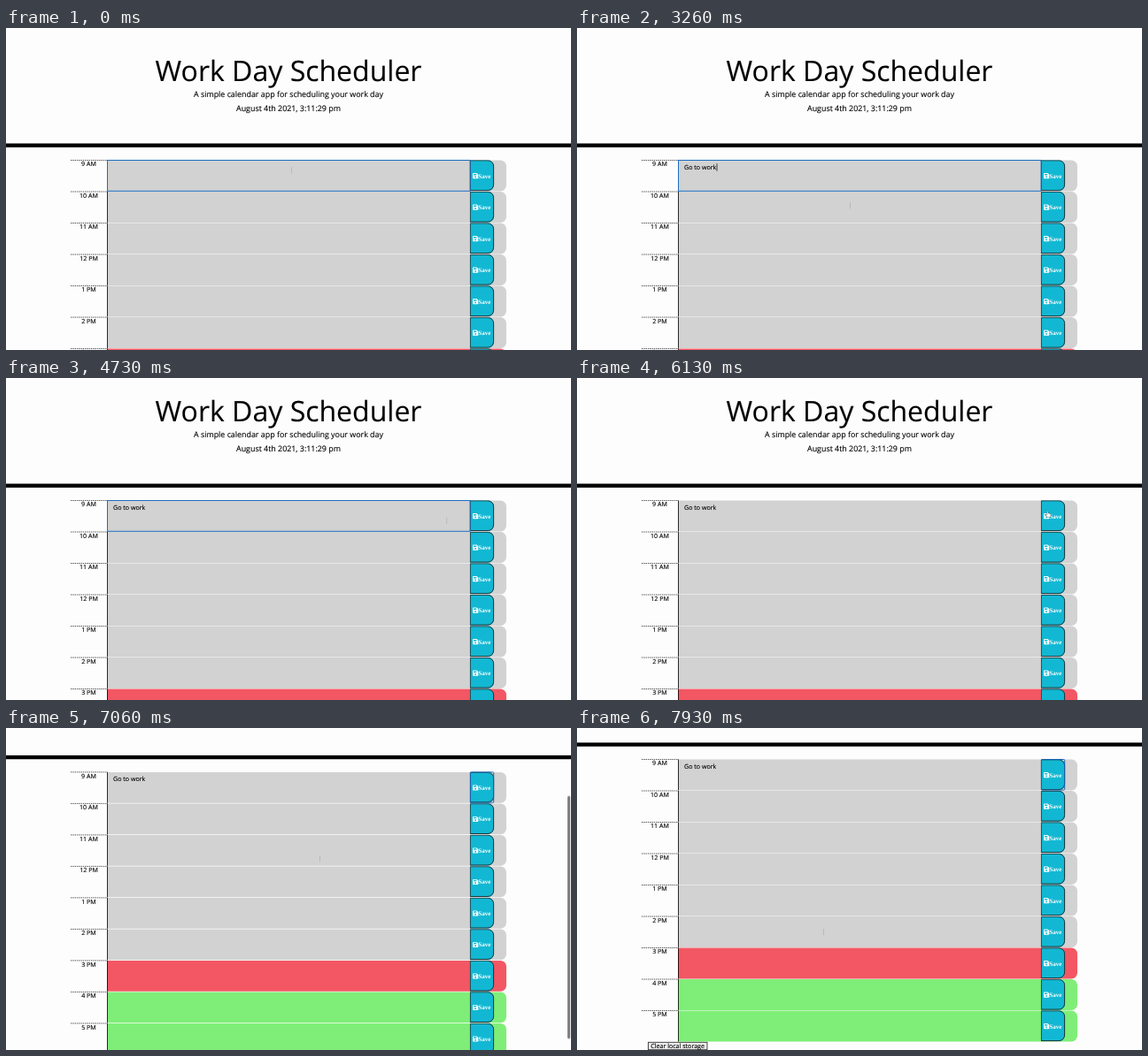
These frames come from a looping animation (638x364 px, 8 s). An HTML page:

```html
<!DOCTYPE html>
<html lang="en">
<head>
<meta charset="utf-8">
<title>Work Day Scheduler</title>
<style>
@property --s { syntax: '<number>'; inherits: true; initial-value: 0; }
html, body { margin: 0; width: 100%; height: 100%; overflow: hidden; background: #fdfdfd; }
svg { display: block; width: 638px; height: 364px; animation: scroll 8s linear infinite; }
text { font: 7.1px 'Open Sans', sans-serif; fill: #000; stroke: #000; stroke-width: .12; text-rendering: geometricPrecision; }
.mid { text-anchor: middle; }
.title { font-size: 32px; }
.lead { font-size: 8.89px; }
.save { font: bold 7.1px 'Liberation Serif', serif; fill: #fff; stroke: none; }

/* --s is the scroll offset shared by page and scrollbar */
#page { transform: translateY(calc(var(--s) * -1px)); }
#thumb { transform: translateY(calc(var(--s) * .75px)); animation: thumb 8s linear infinite; }
#cover { animation: type 8s step-end infinite; }
#caret { animation: caret 8s step-end infinite; }
#field { animation: blur 8s step-end infinite; }
#ring { animation: ring 8s step-end infinite; }
#pointer { animation: move 8s ease-in-out infinite; }
#beam { animation: beam 8s step-end infinite; }
#hand { animation: hand 8s step-end infinite; }
.edge { fill: none; stroke: #1c2426; stroke-width: .9; }
#row0 .edge { animation: press 8s step-end infinite; }

@keyframes scroll {
  0%, 41.6% { --s: 0; }
  42.5% { --s: 4; }
  44.1% { --s: 9.5; }
  45%, 83.3% { --s: 11; }
  84.1% { --s: 24; }
  85% { --s: 42; }
  85.75% { --s: 60.6; }
  87.5% { --s: 92; }
  89.1% { --s: 108; }
  91.6%, 95% { --s: 115; }
  99%, 100% { --s: 114; }
}
@keyframes thumb {
  0%, 41.7% { opacity: 0; }
  43.5%, 53.2% { opacity: 1; }
  57.5%, 83.3% { opacity: 0; }
  84.1%, 95% { opacity: 1; }
  98.7%, 100% { opacity: 0; }
}
@keyframes type {
  0% { transform: none; }
  9.1% { transform: translateX(5.2px); }
  10.4% { transform: translateX(9.5px); }
  11.7% { transform: translateX(11.3px); }
  13% { transform: translateX(13.9px); }
  14.3% { transform: translateX(18.1px); }
  15.6% { transform: translateX(20px); }
  17% { transform: translateX(25.5px); }
  18.2% { transform: translateX(29.8px); }
  20.75% { transform: translateX(32.7px); }
  23.25%, 100% { transform: translateX(36.5px); }
}
@keyframes caret {
  0%, 5%, 30%, 42.5%, 55.4%, 70%, 100% { opacity: 0; }
  .75%, 9.1%, 35.75%, 49.1%, 61.6% { opacity: 1; }
}
@keyframes blur { 0% { opacity: 1; } 70%, 100% { opacity: 0; } }
@keyframes ring { 0% { opacity: 0; } 79.1%, 100% { opacity: 1; } }
@keyframes press { 0%, 76.6%, 100% { opacity: 1; } 70% { opacity: .5; } }
@keyframes move {
  0%, 38.6% { transform: translate(322px, 161px); }
  40.7%, 52.6% { transform: translate(308px, 201px); }
  61.6%, 78.4% { transform: translate(532px, 154px); }
  81.6%, 94.5% { transform: translate(354px, 148px); }
  99.1%, 100% { transform: translate(278px, 231px); }
}
@keyframes beam {
  0%, 38.6%, 78.9%, 100% { opacity: 1; }
  9.1%, 60.5% { opacity: 0; }
}
@keyframes hand { 0%, 78.9%, 100% { opacity: 0; } 60.5% { opacity: 1; } }
</style>
</head>
<body>
<svg viewBox="0 0 638 364">
  <g id="page">
    <text class="mid title" x="319" y="60.4">Work Day Scheduler</text>
    <text class="mid lead" x="319" y="77.6">A simple calendar app for scheduling your work day</text>
    <text class="mid lead" x="319" y="93.7">August 4th 2021, 3:11:29 pm</text>
    <rect y="130.5" width="638" height="4.4"/>
    <g id="rows"></g>
    <text x="121" y="160.1">Go to work</text>
    <g id="cover">
      <rect x="121" y="152" width="42" height="30" fill="#d2d2d2"/>
      <rect id="caret" x="121" y="153.2" width=".7" height="8.6"/>
    </g>
    <rect id="field" x="114.5" y="149.5" width="409.6" height="34.8" fill="none" stroke="#1b6dc1"/>
    <rect id="ring" x="524.4" y="149.5" width="26.3" height="34.6" rx="1" fill="none" stroke="#1763b4"/>
    <rect x="80.4" y="469.3" width="66.6" height="8.4" fill="#efefef" stroke="#333" stroke-width=".9"/>
    <text class="mid" x="113.6" y="475.9">Clear local storage</text>
  </g>
  <rect id="thumb" x="634" y="2" width="3.2" height="274.5" rx="1.6" fill="#808080"/>
  <g id="pointer">
    <path id="beam" d="M.5-3.5V3.5" fill="none" stroke="#999" stroke-width=".6" stroke-dasharray="1.6 .6"/>
    <path id="hand" d="M-1.2-3.4q.7-.7 1.2.1v2l2.4.7q.9.3.7 1.3l-.5 2.6h-3.4l-2.2-2.6q.1-1 1.8-.2z" fill="#fff" stroke="#333" stroke-width=".4"/>
  </g>
</svg>
<script>
const PITCH = 35.5, TOP = 149;
const hours = ['9 AM', '10 AM', '11 AM', '12 PM', '1 PM', '2 PM', '3 PM', '4 PM', '5 PM'];
const colour = i => i < 6 ? '#d2d2d2' : i === 6 ? '#f25763' : '#7fee78';

// box with rounded corners on the right side only
const tab = (x, y, w, h, r = 6.7) =>
  `M${x} ${y}h${w - r}a${r} ${r} 0 0 1 ${r} ${r}v${h - 2 * r}a${r} ${r} 0 0 1 ${-r} ${r}h${r - w}z`;

const disk = `<path fill="#fff" fill-rule="evenodd" d="M.6 0H4.6L6.2 1.6V5.6Q6.2 6.2 5.6 6.2H.6Q0 6.2 0 5.6V.6Q0 0 .6 0z
  M.9 .9V2.4H4.3V.9zM3.1 3.4a.9.9 0 1 0 .01 0z"/>`;

const row = (name, i) => `<g id="row${i}" transform="translate(0 ${TOP + i * PITCH})">
  <path d="M73 .5H114" stroke="#111" stroke-width=".7" stroke-dasharray="1.4 .9"/>
  <text class="mid" x="93.5" y="7.3">${name}</text>
  <path d="${tab(114, .5, 451, 34.9)}" fill="${colour(i)}"/>
  <path d="M114.5 .4V35.4" stroke="#000" stroke-width=".8"/>
  <path d="${tab(524, .6, 27, 34.5)}" fill="#12b8d3"/>
  <path d="M524.4 35V.9H544.5" fill="none" stroke="#222" stroke-width=".7"/>
  <path class="edge" d="M544.5 .9a6.3 6.3 0 0 1 6.1 6.3V28a6.6 6.6 0 0 1-6.6 6.6H524.4"/>
  <g transform="translate(527 15)">${disk}</g>
  <text class="save" x="533.2" y="20.6">Save</text>
</g>`;

document.getElementById('rows').innerHTML = hours.map(row).join('');
</script>
</body>
</html>
```
